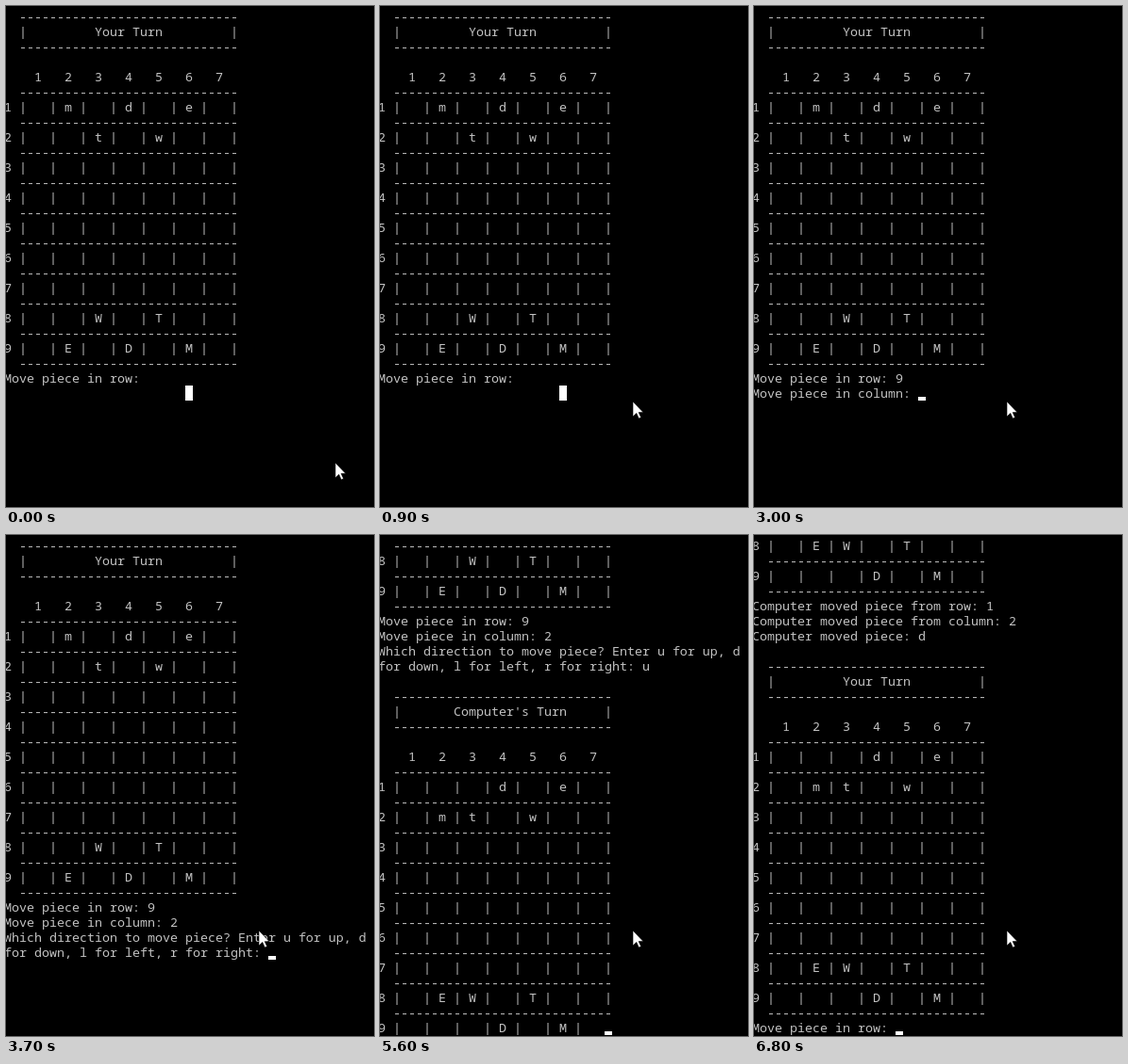
These frames come from a looping animation (390x532 px, 7200 ms). An HTML page:

```html
<!DOCTYPE html>
<html lang="en">
<head>
<meta charset="utf-8">
<title>Terminal board game</title>
<style>
  html, body { margin: 0; width: 100%; height: 100%; overflow: hidden; background: #000; }
  svg { display: block; width: 390px; height: 532px; }
  text { font: 13.3333px "Noto Sans Mono", "DejaVu Sans Mono", monospace; fill: #c2c2c2; white-space: pre; }
</style>
</head>
<body>
<svg viewBox="0 0 390 532">
  <g id="screen"></g>
  <rect id="block" width="8" height="16" fill="#fff"/>
  <rect id="caret" width="8" height="4" fill="#fff"/>
  <path id="mouse" d="M0 0V16L3.8 12.4 6.3 18 8.7 17 6.2 11.6H11Z" fill="#fff" stroke="#000" stroke-width=".6"/>
</svg>
<script>
const LOOP = 7200, CELL_W = 8, CELL_H = 16, LEFT = -2, TOP = 4, ROWS = 33;
const el = id => document.getElementById(id);
const colX = col => LEFT + col * CELL_W;
const rowY = row => TOP + row * CELL_H;

// Pieces are given as row strings, keyed by row number.
function board(title, pieces) {
  const rule = '  ' + '-'.repeat(29);
  const out = [rule, '  |' + title.padEnd(27) + '|', rule, '', '    1   2   3   4   5   6   7', rule];
  for (let r = 1; r <= 9; r++) {
    const cells = [...(pieces[r] || '       ')];
    out.push(`${r} |` + cells.map(c => ` ${c} |`).join(''), rule);
  }
  return out;
}

const yours = '         Your Turn';
const start = { 1: ' m d e ', 2: '  t w  ', 8: '  W T  ', 9: ' E D M ' };
const moved = { 1: '   d e ', 2: ' mt w  ', 8: ' EW T  ', 9: '   D M ' };
const log = [
  ...board(yours, start),
  'Move piece in row: 9',
  'Move piece in column: 2',
  'Which direction to move piece? Enter u for up, d',
  'for down, l for left, r for right: u',
  '',
  ...board("       Computer's Turn", moved),
  'Computer moved piece from row: 1',
  'Computer moved piece from column: 2',
  'Computer moved piece: d',
  '',
  ...board(yours, moved),
  'Move piece in row: '
];

// time, last line, characters shown on it, caret visible
const steps = [
  [0, 24, 19, 0], [1000, 24, 19, 1], [1500, 24, 19, 0], [2000, 24, 19, 1], [2100, 24, 20, 1],
  [2400, 25, 22, 1], [2500, 25, 22, 0], [3000, 25, 22, 1], [3100, 25, 23, 1], [3200, 25, 23, 0],
  [3600, 27, 35, 1], [4100, 27, 35, 0], [4500, 27, 35, 1], [4600, 27, 36, 1], [4700, 27, 36, 0],
  [5100, 28, 0, 1], [5600, 51, 30, 1], [5700, 81, 19, 1], [6300, 81, 19, 0], [6800, 81, 19, 1]
];

const rows = Array.from({ length: ROWS }, (_, i) => {
  const t = document.createElementNS('http://www.w3.org/2000/svg', 'text');
  t.setAttribute('x', LEFT);
  t.setAttribute('y', rowY(i) + 12);
  return el('screen').appendChild(t);
});

function place(node, x, y, visible = true) {
  node.setAttribute('transform', `translate(${x} ${y})`);
  node.setAttribute('visibility', visible ? 'visible' : 'hidden');
}

let shown;
function drawText(step) {
  if (step === shown) return;
  shown = step;
  const [, last, chars, caret] = step;
  const scroll = Math.max(0, last - ROWS + 1);
  rows.forEach((row, i) => {
    const n = i + scroll;
    row.textContent = n < last ? log[n] : n === last ? log[n].slice(0, chars) : '';
  });
  place(el('caret'), colX(chars), rowY(last - scroll) + 11, caret);
}

function render(time) {
  const t = Math.floor(time / 100) * 100;
  drawText(steps.findLast(s => s[0] <= t));

  const [col, row] = t < 1000 ? [24, 25] : [33, 26];
  place(el('block'), colX(col), rowY(row) - 1, t < 2100);

  const p = Math.min(1, t / 800);
  const k = p * p * (3 - 2 * p);
  place(el('mouse'), 349 - 81 * k, 485 - 65 * k);
}

let origin;
function tick(now) {
  origin ??= now;
  render((now - origin) % LOOP);
  requestAnimationFrame(tick);
}
render(0);
requestAnimationFrame(tick);
</script>
</body>
</html>
```
